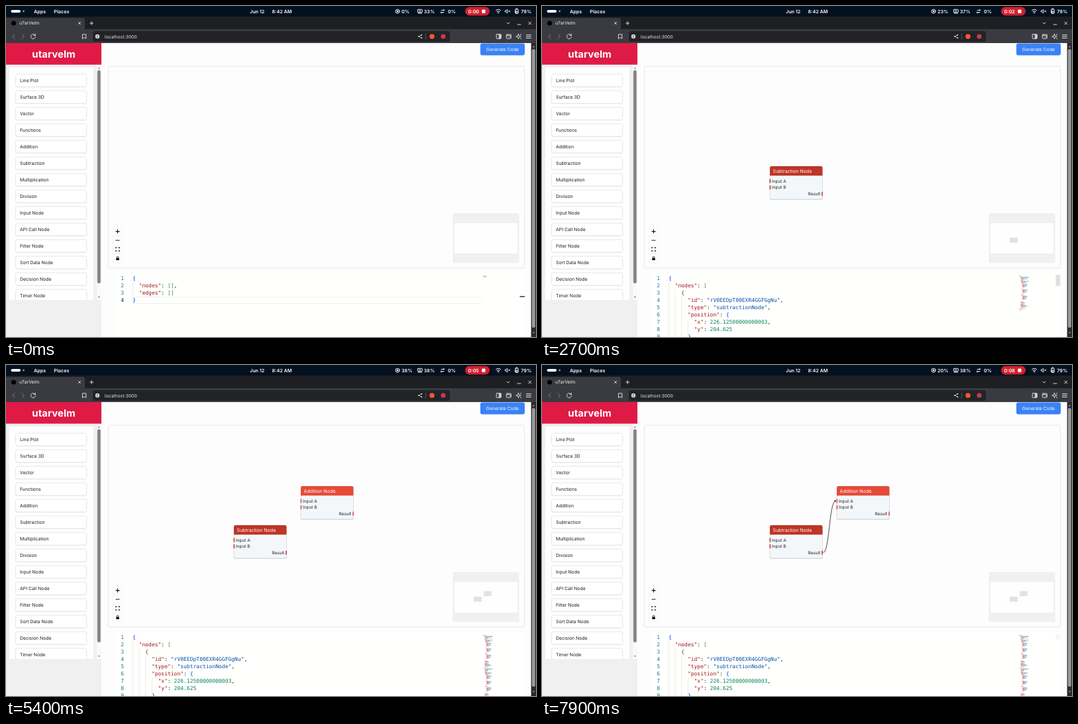
Animation, 800 px wide and 500 px high, one loop 8 s. Source, as an HTML page:

```html
<!DOCTYPE html>
<html lang="en">
<head>
<meta charset="utf-8">
<title>Node editor</title>
<style>
  html, body { margin: 0; width: 100%; height: 100%; overflow: hidden; background: #fdfdfd; }
  svg { display: block; width: 800px; height: 500px; }
  text { font: 400 6.9px Inter, sans-serif; text-rendering: geometricPrecision; white-space: pre; }
  .bar text { font-size: 7.2px; font-weight: 600; fill: #fff; }
  .code text { font: 8px "DejaVu Sans Mono", monospace; }
  .icon { fill: none; stroke: #d8d9dc; stroke-width: 1; stroke-linecap: round; stroke-linejoin: round; }
  .port { font-size: 6.45px; fill: #222; }
  .key { fill: #a31515; } .str { fill: #0451a5; } .num { fill: #098658; } .pun { fill: #222; }
  .b0 { fill: #0431fa; } .b1 { fill: #319331; } .b2 { fill: #7b3814; }
</style>
</head>
<body>
<svg viewBox="0 0 800 500" xmlns="http://www.w3.org/2000/svg">
  <rect width="800" height="500" fill="#fdfdfd"/>

  <g class="bar">
    <rect width="800" height="16" fill="#03101f"/>
    <rect x="7.5" y="6" width="14.5" height="4" rx="2" fill="#fff"/>
    <circle cx="26.5" cy="8" r="1.4" fill="#8b929b"/>
    <text x="42" y="10.6">Apps</text>
    <text x="72.3" y="10.6">Places</text>
    <text x="368" y="10.6">Jun 12</text>
    <text x="401.5" y="10.6">8:42 AM</text>
    <g class="icon" style="stroke:#fff">
      <circle cx="591" cy="8" r="3"/><rect x="589.8" y="6.8" width="2.4" height="2.4" fill="#fff" stroke="none"/>
      <rect x="621.3" y="5.3" width="7" height="4.2" rx=".8"/><path d="M622 11h5.6M623.5 7.4h2.6"/>
      <path d="M657 6.6h5l-1.6-1.6M661 9.6h-5l1.6 1.6"/>
      <path d="M739.5 6.6q3.6-3 7.2 0M741 8.5q2.1-1.7 4.2 0"/><circle cx="743.1" cy="10.3" r=".5" fill="#fff"/>
      <path d="M753.4 7v2h1.2l2 1.8V5.2l-2 1.8zM758.6 6.8l2 2.2M760.6 6.8l-2 2.2" stroke-width=".9"/>
      <rect x="768.6" y="5" width="4.6" height="6.4" rx="1"/><path d="M770 4h1.8M770 8h1.8v2h-1.8z"/>
    </g>
    <text id="cpu" x="597" y="10.5"></text>
    <text id="mem" x="630.8" y="10.5"></text>
    <text x="667" y="10.5">0%</text>
    <rect x="693" y="1.5" width="37" height="13" rx="6.5" fill="#d3202f"/>
    <text id="clock" x="697.6" y="10.6"></text>
    <rect x="718.3" y="5.6" width="5.2" height="5.2" rx="1" fill="#fff"/>
    <text x="777.3" y="10.5">79%</text>
  </g>

  <rect y="16" width="800" height="20" fill="#1e1f23"/>
  <path d="M0 18h115q4 0 4 4v14H0z" fill="#3a3b40"/>
  <rect y="35" width="800" height="21" fill="#3a3b40"/>
  <circle cx="11.5" cy="26" r="3.6" fill="#000"/>
  <text x="20" y="28.4" fill="#f0f0f2">uTarVelm</text>
  <rect x="131" y="38" width="539" height="16" rx="3" fill="#222327"/>
  <text x="149" y="48.5" fill="#e2e3e6">localhost:3000</text>
  <g class="icon">
    <path d="M109.5 24.5l3 3M112.5 24.5l-3 3M126.7 26h5M129.2 23.5v5M756 25l2 2 2-2M772 28h5M788.7 24l4 4M792.7 24l-4 4"/>
    <path d="M13 43l-3 3 3 3M24.5 43l3 3-3 3" stroke="#808287"/>
    <path d="M44 44.2a3.5 3.5 0 1 0 .5 2.4M44.4 42.3v2.3h-2.3M115.8 42.8h5v6.6l-2.5-1.9-2.5 1.9z"/>
    <circle cx="138" cy="46" r="3.2" fill="#d8d9dc" stroke="none"/><path d="M138 45.8v1.6M138 44.3v.1" stroke="#222327"/>
    <path d="M627.3 43.8l-4.4 2.2 4.4 2.2" stroke-width=".8"/>
    <path d="M623 46h.1M627.2 43.8h.1M627.2 48.2h.1" stroke-width="1.9"/>
    <path d="M633.5 42v8" stroke="#55575c"/>
    <rect x="740.2" y="42.7" width="7" height="6.6" rx=".8"/><path d="M744.5 43.2h2.4v5.6h-2.4z" fill="#d8d9dc"/>
    <rect x="755.3" y="43" width="7" height="6.2" rx="1"/><path d="M755.5 44.8h6.6M760 47h2"/>
    <path d="M773.5 42.3l1 2.7 2.7 1-2.7 1-1 2.7-1-2.7-2.7-1 2.7-1zM777 42.3v1.4M777 48.6v1.2"/>
    <path d="M785.4 43.6h7M785.4 46h7M785.4 48.4h7"/>
  </g>
  <circle cx="643" cy="46" r="3.8" fill="#f4562f"/>
  <circle cx="660" cy="46" r="3.6" fill="#c83a50"/>

  <rect y="56" width="144" height="444" fill="#f0f0f0"/>
  <rect y="56" width="144" height="32.6" fill="#df1b45"/>
  <text x="72" y="77.6" text-anchor="middle" fill="#fff" style="font-size:15px;font-weight:700">utarvelm</text>
  <rect x="5" y="93" width="127" height="351" fill="#fefefe"/>
  <rect x="137" y="89" width="7" height="355" fill="#fafafa"/>
  <rect x="137.8" y="97" width="5" height="322" rx="2.5" fill="#858585"/>
  <path d="M138.6 94.5h3.4l-1.7-2zM138.6 439h3.4l-1.7 2z" fill="#777"/>
  <clipPath id="listClip"><rect x="5" y="93" width="127" height="351"/></clipPath>
  <g id="list" clip-path="url(#listClip)"></g>

  <rect x="792.6" y="56" width="7.4" height="444" fill="#2b2b2d"/>
  <rect x="793.8" y="65" width="5" height="421" rx="2.5" fill="#9a9a9a"/>
  <path d="M794.6 62.3h3.4l-1.7-2.2zM794.6 492.5h3.4l-1.7 2.2z" fill="#9a9a9a"/>

  <rect x="716" y="56.4" width="67" height="18.2" rx="3" fill="#3b82f6"/>
  <text x="749.5" y="68" text-anchor="middle" fill="#fff">Generate Code</text>

  <rect x="154.5" y="91" width="628" height="305" rx="2.5" fill="#fdfdfd" stroke="#e6e7e9"/>
  <rect x="162" y="334" width="12.8" height="54" fill="#fff" stroke="#eee" stroke-width=".7"/>
  <path d="M162 347.4h12.8M162 360.9h12.8M162 374.4h12.8" stroke="#eee" stroke-width=".7"/>
  <path d="M165.5 340.6h6M168.5 337.6v6M165.5 354h6M165.8 366.2v-1.4h1.6M169.6 364.8h1.6v1.4M171.2 368.8v1.4h-1.6M167.4 370.2h-1.6v-1.4" fill="none" stroke="#111" stroke-width="1.1"/>
  <rect x="166.2" y="380.4" width="4.6" height="3.6" rx=".5" fill="#111"/>
  <path d="M167.2 380.6v-1a1.3 1.3 0 0 1 2.6 0v1" fill="none" stroke="#111" stroke-width=".9"/>

  <rect x="674.5" y="313" width="100" height="75" fill="#f0f0f0"/>
  <rect x="677" y="328" width="95" height="46" fill="#fefefe"/>

  <g id="sub">
    <rect x="706" y="350" width="12" height="7.6" fill="#e2e2e2"/>
  </g>
  <g id="add">
    <rect x="721" y="341.5" width="12" height="7.6" fill="#e2e2e2"/>
  </g>
  <path id="edge" fill="none" stroke-width=".9"/>
  <circle id="tip" cx="442.6" cy="205.4" r="1.2" fill="#222"/>
  <g id="ghost">
    <rect width="107" height="19" rx="2.5" fill="#fefefe" stroke="#f4f4f4"/>
    <text x="6.7" y="12" fill="#a2a2a2"></text>
  </g>

  <rect x="164" y="403" width="619" height="97" fill="#fffffe"/>
  <g id="code" class="code"></g>
  <rect id="thumb" x="775.4" y="406" width="7" fill="#646464"/>
</svg>

<script>
const $ = id => document.getElementById(id);
const LOOP = 8000, STEP = 100;
const SUB_AT = 2700, ADD_AT = 3800, LINK_AT = 6600, SAVE_AT = 6700;

const items = ['Line Plot', 'Surface 3D', 'Vector', 'Functions', 'Addition', 'Subtraction', 'Multiplication',
  'Division', 'Input Node', 'API Call Node', 'Filter Node', 'Sort Data Node', 'Decision Node', 'Timer Node'];
$('list').innerHTML = items.map((name, i) => {
  const y = 103 + 25 * i;
  return `<rect x="14.6" y="${y + .9}" width="107" height="19" rx="2.5" fill="#eee"/>
    <rect x="14.6" y="${y}" width="107" height="19" rx="2.5" fill="#fff" stroke="#e3e4e7" stroke-width=".9"/>
    <text x="21" y="${y + 12}" fill="#1c1c1c">${name}</text>`;
}).join('');

function nodeBox(x, y, title, color) {
  const port = (px, py) => `<rect x="${px}" y="${py - 3}" width="1.5" height="6" fill="${color}"/>`;
  return `<rect x="${x - .3}" y="${y + .8}" width="80.2" height="50.2" rx="2.5" fill="#d9dcdf"/>
    <rect x="${x}" y="${y}" width="79.4" height="49.8" rx="2.5" fill="#f3f7fa" stroke="#d5d9dd" stroke-width=".6"/>
    <path d="M${x} ${y + 14.2}v-11.7q0-2.5 2.5-2.5h74.4q2.5 0 2.5 2.5v11.7z" fill="${color}"/>
    <text x="${x + 4.6}" y="${y + 9.9}" fill="#fff" style="font-size:7.1px">${title}</text>
    ${port(x - .4, y + 22.4)}${port(x - .4, y + 32)}${port(x + 78.1, y + 41.6)}
    <text class="port" x="${x + 3}" y="${y + 24.7}">Input A</text>
    <text class="port" x="${x + 3}" y="${y + 34.2}">Input B</text>
    <text class="port" x="${x + 76.2}" y="${y + 43.9}" text-anchor="end">Result</text>`;
}
$('sub').innerHTML += nodeBox(344, 242, 'Subtraction Node', '#bf3527');
$('add').innerHTML += nodeBox(445, 183, 'Addition Node', '#e64b39');

// Editor content
const portData = (id, label) => ({ id, label, type: 'number', value: 0, required: true, position: { x: 0 } });
function nodeData(id, type, x, y) {
  return {
    id, type, position: { x, y },
    data: {
      label: type, color: 'red', hint: 'Two numbers',
      inputs: [portData('a', 'Input A'), portData('b', 'Input B')],
      outputs: [portData('result', 'Result')]
    },
    measured: { width: 190, height: 120 }, width: 190, height: 120, selected: false,
    positionAbsolute: { x, y }, dragging: false
  };
}
const subData = nodeData('rV0EEDpT00EXR4GGFGgNu', 'subtractionNode', 226.12500000000003, 204.625);
const addData = nodeData('kQ7LmBw20XHTz8PPDSeVa', 'additionNode', 468.5, 63.25);
const docs = [[], [subData], [subData, addData]]
  .map(nodes => JSON.stringify({ nodes, edges: [] }, null, 2).split('\n'));

// Splits a line into [class, column, text]
function tokens(line, depth) {
  const out = [];
  for (const m of line.matchAll(/("[^"]*")(?=:)|("[^"]*")|([\d.]+|true|false)|([{}[\]])|([:,])/g)) {
    let kind = ['key', 'str', 'num', '', 'pun'][m.slice(1).findIndex(Boolean)];
    if (!kind) {
      const open = '{['.includes(m[0]);
      kind = 'b' + (open ? depth.n++ : --depth.n) % 3;
    }
    out.push([kind, m.index, m[0]]);
  }
  return out;
}

function editor(lines) {
  const CH = 4.816, depth = { n: 0 };
  const empty = lines.length === 4;
  let svg = '';
  if (empty) svg += '<path d="M191 439.6h526M191 449.4h526" stroke="#eee"/><rect x="775.5" y="438" width="7.5" height="1.8" fill="#555"/>';
  lines.forEach((line, i) => {
    const y = 414.4 + 11 * i, row = 407 + i * .833;
    if (row > 500) return;
    const parts = tokens(line, depth);
    for (const [kind, col, s] of parts)
      svg += `<rect class="${kind}" x="${720 + col * .417}" y="${row}" width="${s.length * .417}" height=".6" opacity=".6"/>`;
    if (y > 508) return;
    const indent = line.search(/\S/);
    for (let c = 0; c < indent; c += 2)
      svg += `<rect x="${191 + c * CH}" y="${y - 8.4}" width=".5" height="11" fill="#d6d6d6"/>`;
    const active = empty && i === 3;
    svg += `<text x="178.2" y="${y}" text-anchor="end" fill="${active ? '#0b216f' : '#237893'}">${i + 1}</text>`;
    for (const [kind, col, s] of parts)
      svg += `<text class="${kind}" x="${191 + col * CH}" y="${y}">${s}</text>`;
  });
  return svg;
}
const views = docs.map(editor);

const cpu = [[0, 0], [400, 7], [1400, 18], [2400, 23], [3400, 29], [4400, 34], [5400, 38], [6400, 17], [7400, 20]];
const mem = [[0, 33], [400, 37], [3400, 38]];
const at = (list, t) => list.filter(e => e[0] <= t).pop()[1];
const show = (el, on) => el.setAttribute('visibility', on ? 'visible' : 'hidden');
const clamp = v => Math.max(0, Math.min(1, v));

function drawGhost(t) {
  const ghost = $('ghost');
  const adding = t >= 3100 && t < ADD_AT;
  show(ghost, adding || (t >= 2600 && t < SUB_AT));
  const p = 1 - Math.pow(1 - clamp((t - 3000) / 800), 1.75);
  const [x, y] = adding ? [14.5 + 391 * p, 203 - 23.6 * p] : [273.2, 240];
  ghost.setAttribute('transform', `translate(${x} ${y})`);
  ghost.lastElementChild.textContent = adding ? 'Addition' : 'Subtraction';
}

function drawEdge(t) {
  const p = clamp((t - 5400) / 400);
  const [x, y] = t < 6200 ? [424.5 + 35.5 * p, 283.4 - 73 * p] : [443, 205.4];
  const mid = (424.5 + x) / 2, linked = t >= LINK_AT;
  const edge = $('edge');
  edge.setAttribute('d', `M424.5 283.4C${mid} 283.4 ${mid} ${y} ${x} ${y}`);
  edge.setAttribute('stroke', linked ? '#333' : '#b1b1b7');
  show(edge, p > 0);
  show($('tip'), linked);
}

function drawThumb(t) {
  const since = t - [SAVE_AT, ADD_AT, SUB_AT].find(s => t >= s || s === SUB_AT);
  const fade = since < 0 ? 0 : since < STEP ? .5 : 1 - clamp((since - 500) / 800);
  $('thumb').setAttribute('height', t < ADD_AT ? 17 : 10);
  $('thumb').setAttribute('opacity', .4 * fade);
}

let view = -1, last = -1;
function render(t) {
  $('cpu').textContent = at(cpu, t) + '%';
  $('mem').textContent = at(mem, t) + '%';
  $('clock').textContent = '0:0' + Math.floor((t + 200) / 1000);
  show($('sub'), t >= SUB_AT);
  show($('add'), t >= ADD_AT);
  drawGhost(t);
  drawEdge(t);
  drawThumb(t);
  const next = (t >= SUB_AT) + (t >= ADD_AT);
  if (next !== view) $('code').innerHTML = views[view = next];
}

const start = performance.now();
function tick() {
  const t = Math.floor((performance.now() - start) % LOOP / STEP) * STEP;
  if (t !== last) render(last = t);
  requestAnimationFrame(tick);
}
tick();
</script>
</body>
</html>
```
